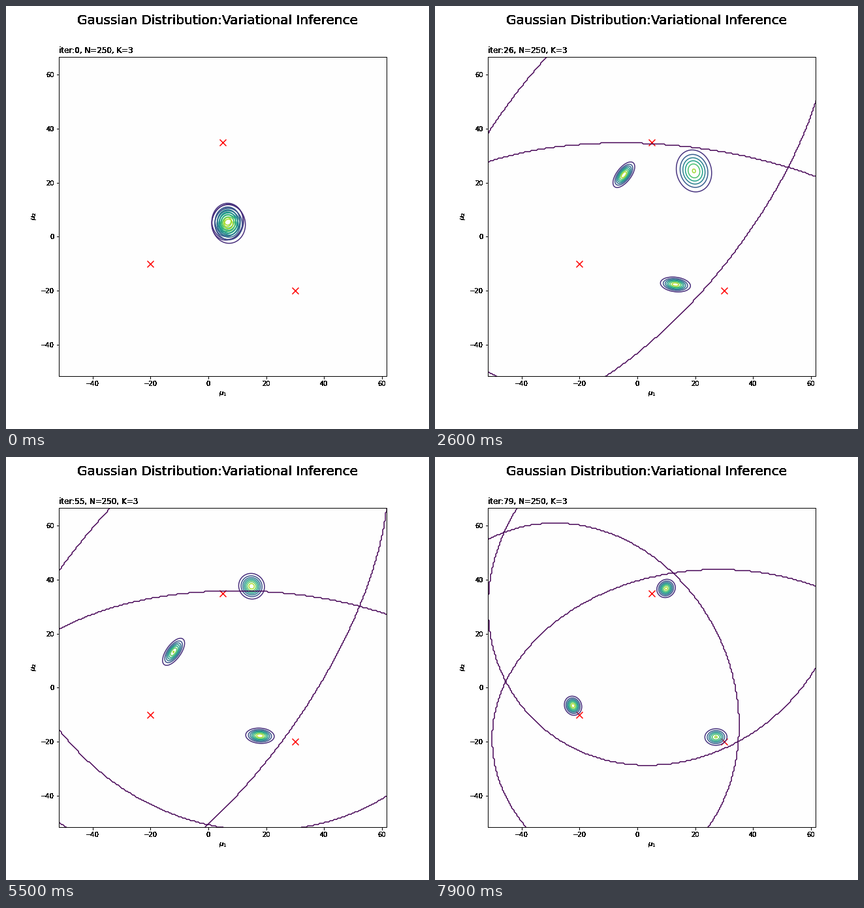
These frames come from a looping animation (648x648 px, 8 s). A matplotlib script:

```python
import numpy as np
import matplotlib.pyplot as plt
from matplotlib.animation import FuncAnimation

FRAMES, INTERVAL = 80, 100
N, K = 250, 3
MU = np.array([[5, 35], [-20, -10], [30, -20]])
REACH = np.sqrt(1000)

# Posterior of each mean (mx, my, sx, sy, rho) at a few iterations
ITERS = np.array([0, 9, 18, 26, 39, 55, 71, 79])
LEFT = [
    (6.6, 5.4, 2.75, 3.40, .10), (4.3, 10, 2.70, 3.20, .30),
    (-2.8, 23.06, 2.07, 2.58, .641), (-4.65, 22.94, 1.844, 2.329, .63),
    (-6.79, 20.4, 1.90, 2.43, .668), (-12, 13.29, 1.917, 2.531, .641),
    (-20.6, -1.72, 1.62, 1.966, .24), (-22.2, -6.67, 1.482, 1.748, -.11)]
TOP = [
    (6.7, 5.7, 2.82, 3.45, 0), (8.3, 8.3, 3.05, 3.65, .05),
    (11.97, 18.2, 3.06, 3.75, .08), (19.57, 24.36, 3.21, 4.08, -.1),
    (19.26, 30.67, 2.90, 3.52, -.12), (14.95, 37.56, 2.20, 2.344, -.044),
    (11.43, 38.43, 1.66, 1.745, .02), (9.94, 36.74, 1.59, 1.692, .105)]
RIGHT = [
    (7.0, 4.7, 2.84, 3.50, -.03), (8.8, -2.2, 2.90, 3.40, -.1),
    (12.65, -17.2, 2.67, 1.413, -.243), (13.17, -17.69, 2.56, 1.354, -.19),
    (14.86, -17.9, 2.53, 1.358, -.158), (17.84, -17.79, 2.42, 1.387, -.09),
    (23.77, -18.27, 2.186, 1.50, 0), (27.15, -18.27, 2.0, 1.604, .012)]


def spline(t, v):
    """Monotone cubic through (t, v), sampled at every iteration."""
    v = np.asarray(v, float)
    h = np.diff(t)[:, None]
    d = np.diff(v, axis=0) / h
    m = np.zeros_like(v)
    prod = d[:-1] * d[1:]
    total = np.where(prod > 0, d[:-1] + d[1:], 1)
    m[1:-1] = np.where(prod > 0, 2 * prod / total, 0)
    m[-1] = d[-1]
    x = np.arange(FRAMES)
    i = np.clip(np.searchsorted(t, x, side="right") - 1, 0, len(t) - 2)
    s = ((x - t[i]) / h[i, 0])[:, None]
    return (v[i] * (1 + 2 * s) * (1 - s)**2 + v[i + 1] * s**2 * (3 - 2 * s)
            + h[i] * (m[i] * s * (1 - s)**2 + m[i + 1] * s**2 * (s - 1)))


def density(mx, my, sx, sy, rho):
    u, v = (X - mx) / sx, (Y - my) / sy
    q = 1 - rho**2
    maha = (u * u - 2 * rho * u * v + v * v) / q
    return np.exp(-maha / 2 - np.log(2 * np.pi * sx * sy * np.sqrt(q)))


def harden(img, dpi):
    """Turn soft text edges into solid black."""
    out = np.zeros_like(img)
    out[..., 3] = img[..., 3] > .1
    return out, 0, 0


plt.rcParams.update({"font.family": "DejaVu Sans", "font.size": 10,
                     "axes.linewidth": 1})
fig = plt.figure(figsize=(9, 9), dpi=72, facecolor="white")
fig.subplots_adjust(left=.125, right=.9, bottom=.125, top=.88)
ax = fig.add_subplot(facecolor="#fefefe")

lo, hi = MU.min(axis=0) - REACH, MU.max(axis=0) + REACH
X, Y = np.meshgrid(*(np.linspace(a, b, 250) for a, b in zip(lo, hi)))
paths = [spline(ITERS, keys) for keys in (LEFT, TOP, RIGHT)]

ax.set(xlim=(lo[0], hi[0]), ylim=(lo[1], hi[1]),
       xlabel=r"$\mu_1$", ylabel=r"$\mu_2$")
ax.scatter(*MU.T, color="red", s=100, marker="x")
head = fig.suptitle("Gaussian Distribution:Variational Inference", fontsize=20)
title = ax.set_title("", loc="left")
for artist in (head, title, ax.xaxis, ax.yaxis):
    artist.set_agg_filter(harden)

contours = []


def update(i):
    while contours:
        contours.pop().remove()
    for path in paths:
        contours.append(ax.contour(X, Y, density(*path[i])))
    title.set_text(f"iter:{i}, N={N}, K={K}")


anim = FuncAnimation(fig, update, frames=FRAMES, init_func=lambda: update(0),
                     interval=INTERVAL, repeat=True, repeat_delay=0)
plt.show()
```
